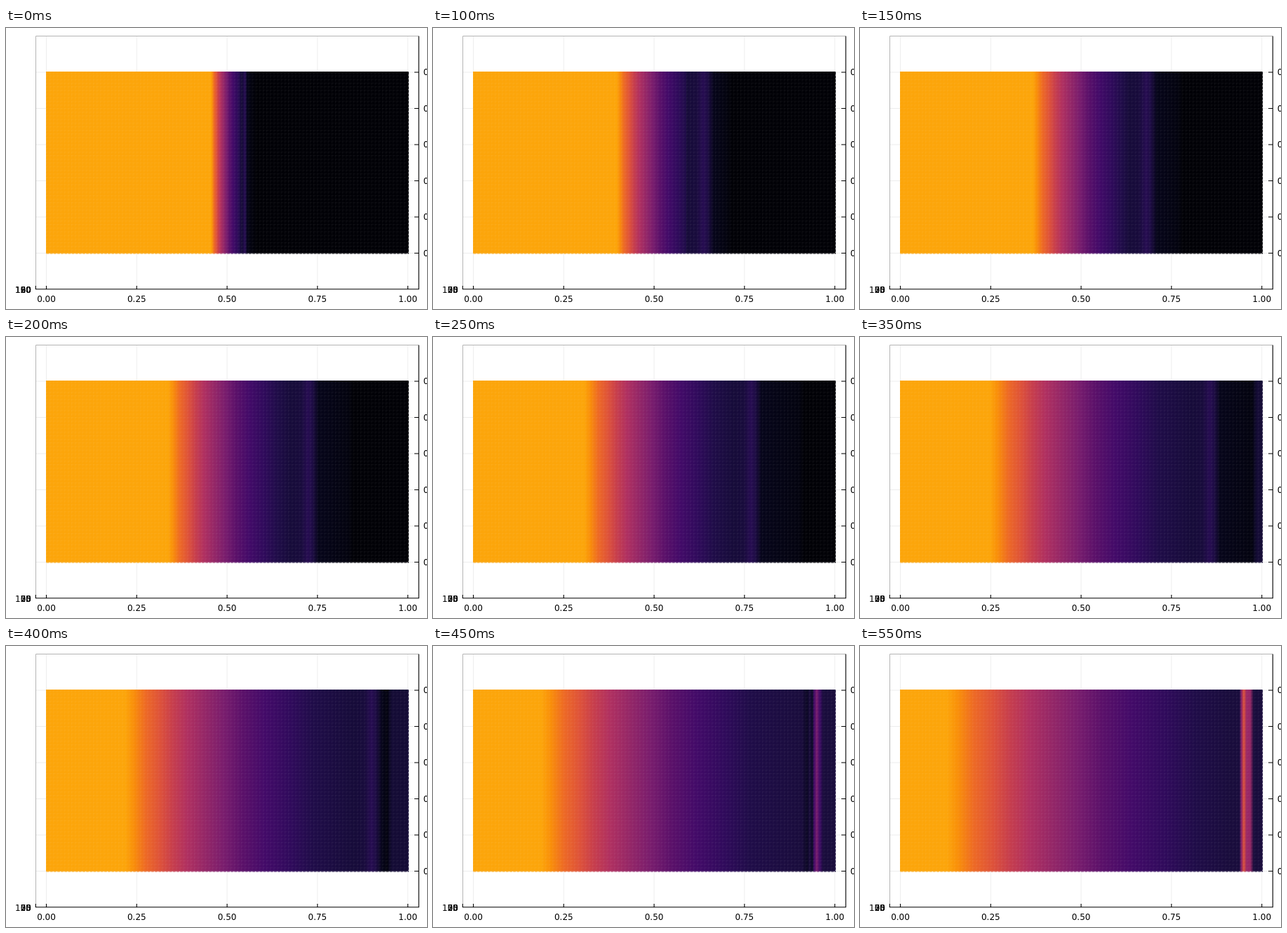
An HTML page for the animation above (0.6 s loop, 600 px wide and 400 px high).

```html
<!DOCTYPE html>
<html lang="en">
<head>
<meta charset="utf-8">
<title>Shock tube</title>
<style>
  html, body { margin: 0; width: 100%; height: 100%; overflow: hidden; background: #fff; }
  svg { display: block; width: 600px; height: 400px; }
  text { font: 12px "DejaVu Sans", sans-serif; fill: #000; }
  #xLabels text { text-anchor: middle; }
  #zLabels text { text-anchor: end; }
</style>
</head>
<body>
<svg viewBox="0 0 600 400">
  <defs>
    <linearGradient id="field" gradientUnits="userSpaceOnUse" x1="57" y1="0" x2="574" y2="0"></linearGradient>
    <pattern id="weave" patternUnits="userSpaceOnUse" x="57" y="62.4" width="5.15" height="5.16">
      <path d="M0 .5H3.6M.5 0V3.6" stroke="#fff" stroke-opacity=".06" stroke-width=".8"/>
    </pattern>
  </defs>
  <path id="grid" fill="none" stroke="#000" stroke-opacity=".07"/>
  <path d="M42.5 371.5V11.5H588" fill="none" stroke="#b4b4b4"/>
  <rect x="57" y="62" width="516.4" height="258.6" fill="url(#field)"/>
  <path d="M573.6 62.5V321M57.5 321H574" fill="none" stroke="url(#field)" stroke-dasharray="4 1.15"/>
  <rect x="57" y="62" width="516.4" height="258.6" fill="url(#weave)"/>
  <path id="axes" fill="none" stroke="#000" stroke-width="1.1"/>
  <g id="xLabels"></g>
  <g id="yLabels"></g>
  <g id="zLabels"></g>
</svg>
<script>
const STEP = 50, COUNT = 12, LEFT = 57, RIGHT = 574, MID = 315;
const $ = id => document.getElementById(id);
const range = (n, f) => Array.from({ length: n }, (_, i) => f(i));
const label = (x, y, s) => `<text x="${x}" y="${y}">${s}</text>`;

// Axes, grid and labels
const xs = range(5, i => 57.5 + 128.8 * i);
const ys = range(6, i => 63 + 51.5 * i);
$('grid').setAttribute('d',
  xs.map(x => `M${x} 12V371`).join('') + ys.map(y => `M43 ${y}H588`).join(''));
$('axes').setAttribute('d', 'M42 371.7H588.3V11.5M42.3 367V372' +
  xs.map(x => `M${x} 367V371.5`).join('') + ys.map(y => `M582 ${y}H588`).join(''));
$('xLabels').innerHTML = xs.map((x, i) => label(x, 390, (i / 4).toFixed(2))).join('');
$('yLabels').innerHTML = ys.map((y, i) => label(594.8, y + 4.4, (0.5 - i / 10).toFixed(1))).join('');

// Expansion fan: every colour leaves the middle at its own speed (px per step)
const fan = [
  [-15.3, '#fca50a'], [-14, '#f98e09'], [-12.2, '#ed6925'], [-10, '#dd513a'],
  [-8.2, '#c73e4c'], [-6, '#b03060'], [-3.2, '#932667'], [-0.4, '#781c6d'],
  [2.4, '#5a1069'], [5.8, '#420a68'], [9.6, '#2f0a5b'], [13, '#1f0c48']
];
const fanAt = n => fan.map(([v, c]) => [MID + v * (n + 1.5), c]);

// Shock and its faint precursor, which the wall throws back
function shockAt(n) {
  const x = 340 + 22.6 * n, tip = 357 + 34.5 * n;
  const wall = RIGHT - Math.max(0, tip - RIGHT) / 2.2;
  const width = Math.min(1, (n + 0.5) / 2);
  return [
    [x - 24 * width, '#160b39'], [x - 10 * width, '#180b3c'], [x, '#260c51'],
    [x + 6 * width, '#1e0c45'], [x + 15 * width, '#06051a'],
    [Math.min(tip - 8, wall - 4), '#03030f'],
    ...(tip < RIGHT ? [[tip, '#010106']] : [[wall, '#0c0826'], [wall + 3, '#140b35']])
  ];
}

// Shock meets its reflection: a hot stripe that brightens with k
const mix = (a, b, k) => 'rgb(' + a.map((v, i) => Math.round(v + (b[i] - v) * k)) + ')';
const night = [25, 12, 60], black = [11, 7, 36], plum = [64, 10, 103];
const mauve = [120, 28, 109], rose = [152, 39, 102], red = [221, 81, 58];
const stripeAt = k => [
  [526, mix(night, night, k)], [533, mix(black, night, k)], [537, mix(night, night, k)],
  [541, mix(black, night, k)], [543, mix(plum, mauve, k)], [547, mix(mauve, red, k)],
  [551, mix(plum, rose, k)], [556, mix(night, rose, k)], [561, mix(night, night, k)]
];

function draw(n) {
  const front = n < 9 ? shockAt(n) : stripeAt((n - 9) / 2);
  $('field').innerHTML = [...fanAt(n), ...front].map(([x, c]) =>
    `<stop offset="${Math.min(1, (x - LEFT) / (RIGHT - LEFT))}" stop-color="${c}"/>`).join('');
  const ticks = n ? range(5, i => 25 * i) : range(6, i => 30 * i);
  $('zLabels').innerHTML = ticks.map(v => label(36, 376.5, v)).join('');
}

const start = performance.now();
let shown = -1;
function tick() {
  const n = Math.floor((performance.now() - start) / STEP) % COUNT;
  if (n !== shown) draw(shown = n);
  requestAnimationFrame(tick);
}
tick();
</script>
</body>
</html>
```
